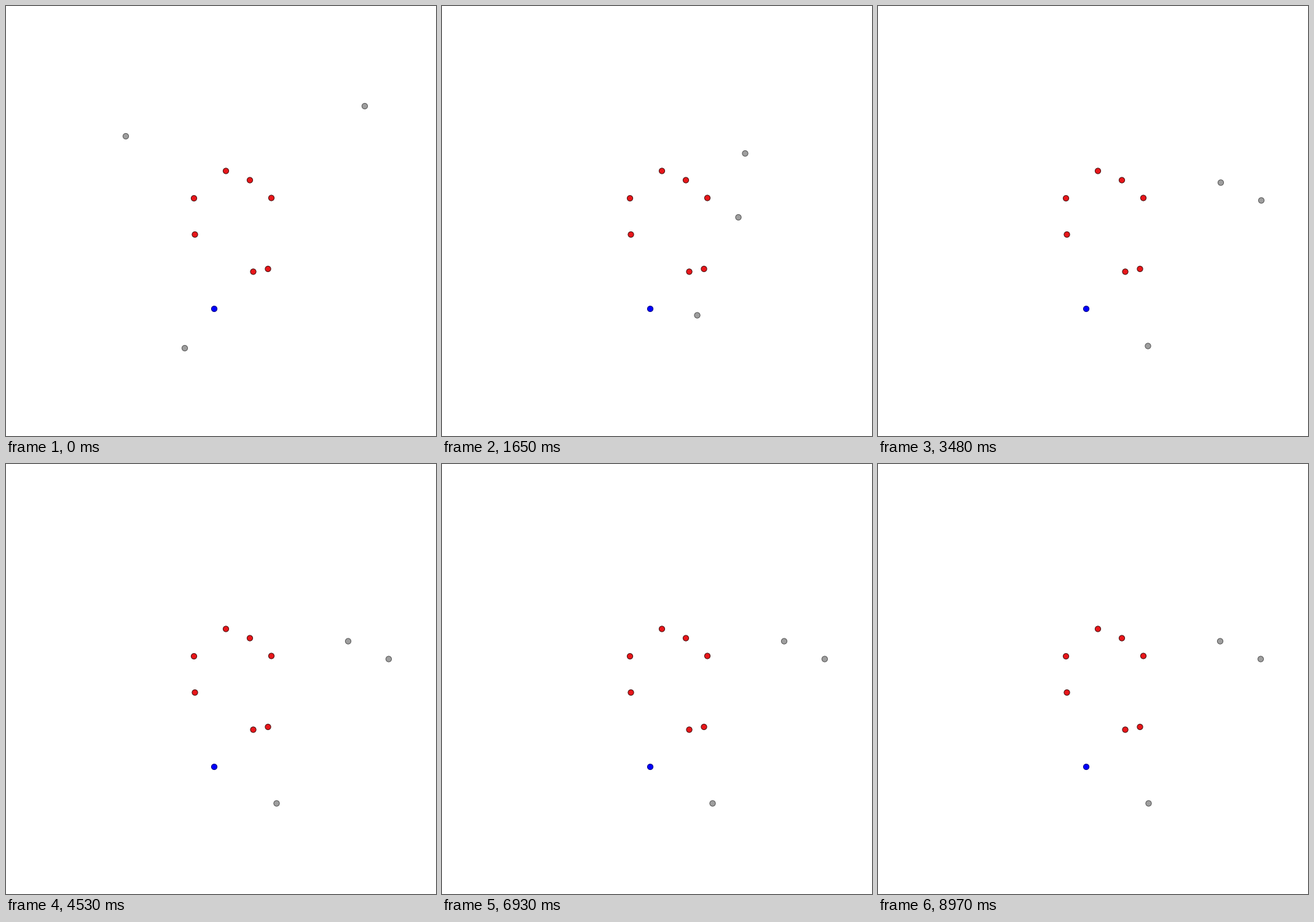
A matplotlib script that plays this animation: 700x700 px, repeating every 9 s.

```python
import numpy as np
import matplotlib.pyplot as plt
from matplotlib.animation import FuncAnimation
from matplotlib.patches import Circle

SIZE, FRAMES, STEP_MS = 700, 300, 30
RED = [(358, 268.5), (397, 283.5), (306, 313), (432, 312.5),
       (307.5, 372), (402.5, 432.5), (426.5, 428)]
BLUE = (339, 493)

# each walker starts, turns, swings out, then settles
TIMES = np.array([0, 55, 82, 108])
WALKS = np.array([
    [(195, 212), (493.5, 240), (569, 288), (557.5, 288)],
    [(584, 163), (482.5, 344), (608, 325.5), (623.5, 317)],
    [(291, 557), (415.5, 503.5), (430.5, 560), (440, 553)],
])
TREMBLE = 0.5 * np.outer([1, 1, -1], [1, -1])


def smooth_slopes(points):
    """Harmonic mean of neighbouring speeds, zero where a walker turns back."""
    speed = np.diff(points, axis=0) / np.diff(TIMES)[:, None]
    a, b = speed[:-1], speed[1:]
    same = a * b > 0
    inner = np.where(same, 2 * a * b / np.where(same, a + b, 1), 0)
    return np.vstack([speed[:1], inner, np.zeros((1, 2))])


def along(points, slopes, t):
    """Cubic Hermite curve through the points, at rest after the last."""
    t = min(t, TIMES[-1])
    i = min(np.searchsorted(TIMES, t, side="right"), len(TIMES) - 1) - 1
    h = TIMES[i + 1] - TIMES[i]
    u = (t - TIMES[i]) / h
    ease = u * u * (3 - 2 * u)
    bend = slopes[i] * (1 - u) - slopes[i + 1] * u
    return points[i] + ease * (points[i + 1] - points[i]) + h * u * (1 - u) * bend


fig = plt.figure(figsize=(7, 7), dpi=100, facecolor="white")
ax = fig.add_axes([0, 0, 1, 1])
ax.set_xlim(0, SIZE)
ax.set_ylim(SIZE, 0)
ax.axis("off")


def dot(pos, fill, edge):
    return ax.add_patch(Circle(pos, 4.6, facecolor=fill, edgecolor=edge,
                               linewidth=0.72))


for pos in RED:
    dot(pos, "#e8161a", "#451010")
dot(BLUE, "#0000ff", "#00007a")
walkers = [dot(walk[0], "#9e9e9e", "#555555") for walk in WALKS]
slopes = [smooth_slopes(walk) for walk in WALKS]


def update(n):
    sign = 0 if n < TIMES[-1] else (-1) ** n
    for walker, walk, slope, shake in zip(walkers, WALKS, slopes, TREMBLE):
        walker.center = along(walk, slope, n) + sign * shake
    return walkers


anim = FuncAnimation(fig, update, frames=FRAMES, interval=STEP_MS,
                     repeat=True, repeat_delay=0)
plt.show()
```
